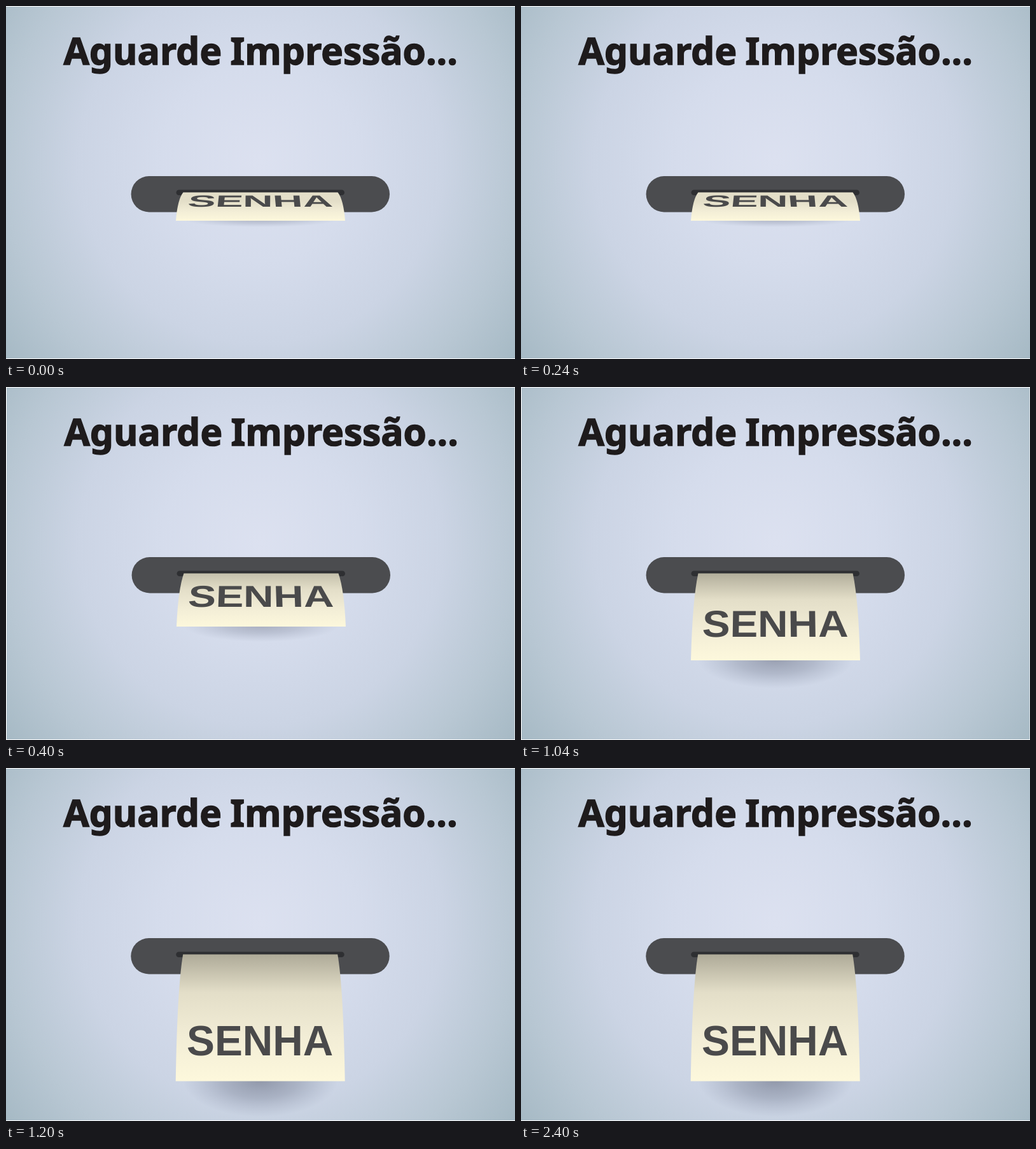
Animation of 800 by 554 pixels, one loop 3.2 s. Source, as an HTML page with a canvas:

```html
<!DOCTYPE html>
<html lang="pt">
<meta charset="utf-8">
<title>Aguarde Impressão</title>
<style>
  html, body { margin: 0; width: 100%; height: 100%; overflow: hidden; background: #fff; }
  canvas { display: block; }
</style>
<canvas id="stage" width="800" height="554"></canvas>
<script>
const ctx = document.getElementById('stage').getContext('2d');
const LOOP = 3200, STEP = 400, PAPER_TOP = 292.5;

// Paper pose: horizontal jitter, picture's left edge, paper bottom, text baseline, cap height,
// inward lean of the letters, shadow depth and opacity, top shade, bend height
const poses = [
  { dx: 0, left: 0, bottom: 337, base: 314.5, cap: 18, lean: .04, depth: 12, dark: .28, shade: '#e4dfc9', bend: 304 },
  { dx: 1, left: 1, bottom: 376, base: 344.5, cap: 33.5, lean: .025, depth: 26, dark: .32, shade: '#c4c0ab', bend: 318 },
  { dx: 0, left: 1, bottom: 429, base: 391.5, cap: 41.5, lean: .015, depth: 46, dark: .42, shade: '#b2ae9b', bend: 334 },
  { dx: -.3, left: 0, bottom: 491.5, base: 450.5, cap: 47, lean: 0, depth: 58, dark: .46, shade: '#aeaa98', bend: 345 },
];

function gradient(g, stops) {
  for (const [at, color] of stops) g.addColorStop(at, color);
  return g;
}

function pill(x, y, w, h, color) {
  ctx.fillStyle = color;
  ctx.beginPath();
  ctx.roundRect(x, y, w, h, h / 2);
  ctx.fill();
}

function drawBackground(left) {
  ctx.fillStyle = '#fff';
  ctx.fillRect(0, 0, 800, 554);
  ctx.fillStyle = gradient(ctx.createRadialGradient(400, 245, 0, 400, 245, 520), [
    [0, '#dce1f0'], [.3, '#d5dcec'], [.55, '#cbd4e4'], [.78, '#b8c7d3'], [1, '#a3b7c2'],
  ]);
  ctx.fillRect(left, 1, 800 - left * 1.5, 552);
}

function drawTitle() {
  ctx.font = 'bold 58.6px "Noto Sans", "Open Sans", sans-serif';
  ctx.fillStyle = ctx.strokeStyle = '#1e1b1c';
  ctx.lineWidth = 1.5;
  for (const [word, x] of [['Aguarde', 90.5], ['Impressão...', 352.5]]) {
    ctx.fillText(word, x, 91.8);
    ctx.strokeText(word, x, 91.8);
  }
}

function drawShadow({ bottom, depth, dark }) {
  ctx.save();
  ctx.beginPath();
  ctx.rect(0, bottom - 1, 800, 553 - bottom);
  ctx.clip();
  ctx.translate(400, bottom - 2);
  ctx.scale(122, depth);
  ctx.fillStyle = gradient(ctx.createRadialGradient(0, 0, 0, 0, 0, 1), [
    [0, `rgba(70,75,95,${dark})`], [.5, `rgba(80,88,110,${dark * .6})`], [1, 'rgba(100,110,135,0)'],
  ]);
  ctx.fillRect(-1, -1, 2, 2);
  ctx.restore();
}

function drawPaper({ bottom, shade, bend }) {
  ctx.fillStyle = gradient(ctx.createLinearGradient(0, PAPER_TOP, 0, bottom), [
    [0, shade], [.3, '#e3dec8'], [.65, '#f2edd6'], [1, '#fdf8dc'],
  ]);
  ctx.beginPath();
  ctx.moveTo(278.5, PAPER_TOP);
  ctx.quadraticCurveTo(269.5, bend, 267, bottom);
  ctx.lineTo(533, bottom);
  ctx.quadraticCurveTo(530.5, bend, 521.5, PAPER_TOP);
  ctx.fill();
}

function drawLabel({ base, cap, lean, dx }) {
  const fullCap = 46.5;
  ctx.font = 'bold 65.8px "Liberation Sans", Arial, sans-serif';
  ctx.fillStyle = '#4a4a4b';
  let x = 399.5 - ctx.measureText('SENHA').width / 2;
  for (const letter of 'SENHA') {
    const width = ctx.measureText(letter).width;
    const skew = (x + width / 2 - 400) * lean / fullCap;
    ctx.setTransform(1, 0, skew, cap / fullCap, x + dx, base);
    ctx.fillText(letter, 0, 0);
    x += width;
  }
  ctx.resetTransform();
}

function draw(pose) {
  drawBackground(pose.left);
  ctx.translate(pose.dx, 0);
  drawTitle();
  drawShadow(pose);
  pill(196.6, 267, 406.4, 56.4, '#4b4c4f');
  pill(267.5, 288.5, 264.5, 8.5, '#2e2f32');
  drawPaper(pose);
  drawLabel(pose);
}

function frame() {
  const step = Math.floor(performance.now() % LOOP / STEP);
  draw(poses[Math.min(step, poses.length - 1)]);
  requestAnimationFrame(frame);
}
frame();
</script>
</html>
```
